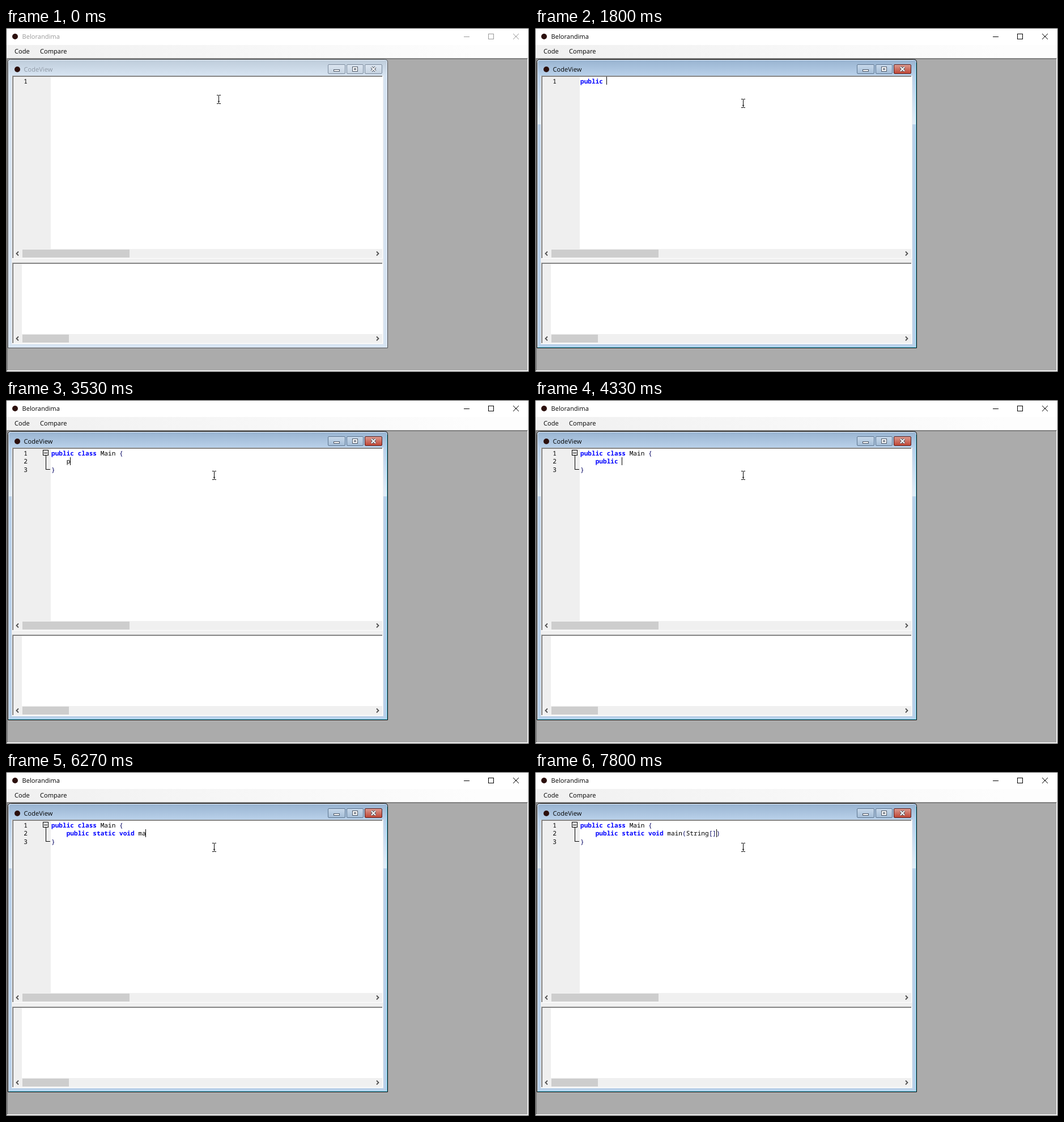
These frames come from a looping animation (923 by 607 pixels, 8000 ms). An HTML page:

```html
<!DOCTYPE html>
<html lang="en">
<head>
<meta charset="utf-8">
<title>Code editor</title>
<style>
  html, body { margin: 0; width: 100%; height: 100%; overflow: hidden; background: #fff; }
  svg { display: block; shape-rendering: crispEdges; }
  text { white-space: pre; text-rendering: geometricPrecision; }
  .ui { font: 11.1px "Open Sans", "Noto Sans", sans-serif; }
  .code { font: 11.11px "Noto Sans Mono", "DejaVu Sans Mono", monospace; }
  .kw { font-weight: bold; fill: #00f; }
  .op { fill: #000060; }
  .smooth { shape-rendering: auto; }
  .line { fill: none; stroke: #000; }

  #stage {
    --title: #999; --control: #999; --childTitle: #8f99a5;
    --bar: #bfcddb; --frame: #d7e4f2; --shine: #d7e4f2;
    --edge: #4b4f54; --glow: #e6eef8;
    --btnTop: #dbe5f0; --btnBottom: #c6d3e1; --btnEdge: #7b8a9c;
    --closeTop: #dbe5f0; --closeBottom: #c6d3e1; --closeEdge: #7b8a9c;
  }
  #stage.active {
    --title: #000; --control: #000; --childTitle: #000;
    --bar: #99b4d1; --frame: #b9d1ea; --shine: #e3eef9;
    --edge: #000; --glow: #5fd3ee;
    --btnTop: #c8d9eb; --btnBottom: #a4bdd7; --btnEdge: #5d7590;
    --closeTop: #dc9c92; --closeBottom: #bf4433; --closeEdge: #571d1d;
  }
  #minus, #square, #cross { fill: none; stroke: var(--control); }
</style>
</head>
<body>
<svg id="stage" width="923" height="607" viewBox="0 0 923 607">
  <defs>
    <linearGradient id="menuFill">
      <stop offset="0" stop-color="#f0f0f0"/><stop offset=".9" stop-color="#fdfdfd"/>
    </linearGradient>
    <linearGradient id="barFill" x2="0" y2="1">
      <stop offset="0" stop-color="var(--bar)"/><stop offset="1" stop-color="var(--frame)"/>
    </linearGradient>
    <linearGradient id="sideFill" x2="0" y2="1">
      <stop offset="0" stop-color="var(--frame)"/><stop offset="1" stop-color="var(--shine)"/>
    </linearGradient>
    <linearGradient id="btnFill" x2="0" y2="1">
      <stop offset="0" stop-color="var(--btnTop)"/><stop offset="1" stop-color="var(--btnBottom)"/>
    </linearGradient>
    <linearGradient id="closeFill" x2="0" y2="1">
      <stop offset="0" stop-color="var(--closeTop)"/><stop offset="1" stop-color="var(--closeBottom)"/>
    </linearGradient>
  </defs>

  <!-- Main window -->
  <rect x=".5" y=".5" width="922" height="606" fill="#fff" stroke="#444"/>
  <circle class="smooth" cx="16" cy="15" r="5" fill="#2b0f0c"/>
  <text class="ui" x="28.5" y="19" fill="var(--title)">Belorandima</text>
  <path id="minus" d="M808 15.5h10"/>
  <rect id="square" x="851.5" y="10.5" width="9" height="9"/>
  <path id="cross" class="smooth" d="M895 10l10 10M905 10l-10 10"/>
  <rect x="1" y="30" width="921" height="23" fill="url(#menuFill)"/>
  <text class="ui" x="15" y="45">Code</text>
  <text class="ui" x="60" y="45">Compare</text>
  <rect x="1" y="53" width="921" height="553" fill="#ababab"/>
  <path d="M1.5 606V53.5H922" fill="none" stroke="#a0a0a0"/>
  <path d="M2.5 605V54.5H921" fill="none" stroke="#696969"/>
  <path d="M2 604.5H920.5V54" fill="none" stroke="#e3e3e3"/>
  <path d="M1 605.5H921.5V53" fill="none" stroke="#fff"/>

  <!-- Child window -->
  <path class="smooth" d="M3.5 564.5V60.5q0-5 5-5H668.500q5 0 5 5V564.500z" fill="var(--frame)" stroke="var(--edge)"/>
  <path class="smooth" d="M5 84V61q0-4 4-4H668q4 0 4 4V84z" fill="url(#barFill)"/>
  <path d="M5 84h6v86h-6zM666 84h6v86h-6z" fill="url(#sideFill)"/>
  <path class="smooth" d="M4.500 563V61q0-4.500 4.500-4.500H668" fill="none" stroke="#eef4fb"/>
  <path d="M5 563.5H672.5V61" fill="none" stroke="var(--glow)"/>
  <circle class="smooth" cx="20" cy="73" r="5" fill="#2b0f0c"/>
  <text class="ui" x="31.500" y="77" fill="var(--childTitle)">CodeView</text>
  <g class="smooth">
    <g fill="url(#btnFill)" stroke="var(--btnEdge)">
      <rect x="568.5" y="64.5" width="30" height="16" rx="1.5"/>
      <rect x="601.5" y="64.5" width="29" height="16" rx="1.5"/>
    </g>
    <rect x="633.5" y="64.5" width="30" height="16" rx="1.5" fill="url(#closeFill)" stroke="var(--closeEdge)"/>
    <g fill="#fff" stroke="#4c5665">
      <rect x="578.5" y="73.5" width="10" height="3"/>
      <rect x="611.5" y="68.5" width="9" height="8"/>
      <rect x="614.5" y="71.5" width="3" height="2"/>
    </g>
    <path d="M645 69l7 7M652 69l-7 7" stroke="#4c5665" stroke-width="4"/>
    <path d="M645 69l7 7M652 69l-7 7" stroke="#fff" stroke-width="2"/>
  </g>
  <rect x="10" y="84" width="656" height="474" fill="#f0f0f0"/>
  <g id="panes"></g>

  <!-- Editor contents -->
  <g class="code">
    <text x="31.3" y="97.5">1</text>
    <g id="block">
      <text x="31.3" y="112">2</text>
      <text x="31.3" y="126.500">3</text>
      <path class="line" d="M65.500 88.500h9v9h-9zM67 93.500h6M70.500 98V122.500H78"/>
      <text class="op" x="80" y="126.500">}</text>
    </g>
    <text id="line1" x="80" y="97.500"></text>
    <text id="line2" x="80" y="112"></text>
  </g>
  <rect id="caret" width="1" height="14"/>
  <path id="pointer" class="line" d="M-3 -7.500h3M1 -7.500h3M.500 -7V7M-3 7.500h3M1 7.500h3M-1 3.500h3"/>
</svg>

<script>
const byId = id => document.getElementById(id);
const stage = byId("stage");
const LOOP = 8000, LEFT = 80, ADVANCE = 6.667;

function pane(top, bottom, gutter, thumbEnd) {
  const barTop = bottom - 16, mid = barTop + 8;
  return `<rect x="11" y="${top}" width="654" height="${bottom - top}" fill="#fff"/>
    <rect x="13" y="${top + 2}" width="${gutter - 13}" height="${barTop - top - 2}" fill="#efefef"/>
    <rect x="13" y="${barTop}" width="651" height="16" fill="#f0f0f0"/>
    <rect x="29" y="${barTop + 1}" width="${thumbEnd - 29}" height="14" fill="#cdcdcd"/>
    <path class="smooth" d="M22 ${mid - 3.5}l-3.500 3.500l3.500 3.500M654 ${mid - 3.5}l3.500 3.500l-3.500 3.500"
      fill="none" stroke="#505050" stroke-width="1.800"/>
    <path d="M11.500 ${bottom}V${top + .5}H665" fill="none" stroke="#a0a0a0"/>
    <path d="M12.500 ${bottom}V${top + 1.5}H664" fill="none" stroke="#696969"/>
    <path d="M11 ${bottom + .5}H664.500V${top}" fill="none" stroke="#fff"/>`;
}
byId("panes").innerHTML = pane(84, 406, 79, 218) + pane(414, 556, 28, 111);

// One key time per character of the script
const script = "public class Main {\npublic static void main(String[]";
const keyTimes = [
  930, 1200, 1270, 1470, 1600, 1670, 1800,
  1930, 2000, 2070, 2130, 2270, 2400,
  2530, 2670, 2730, 2870, 2930, 3130, 3330,
  3530, 3730, 3800, 4000, 4200, 4270, 4330,
  4600, 4800, 4930, 5000, 5130, 5200, 5330,
  5470, 5600, 5800, 5930, 6000,
  6130, 6270, 6400, 6470, 6670,
  6800, 6870, 7070, 7200, 7200, 7330, 7600, 7800
];
const PAIRS = { "{": "}", "(": ")", "[": "]" };

// Brackets the editor closes by itself
function closers(text) {
  let open = "";
  for (const ch of text) {
    if (PAIRS[ch]) open = PAIRS[ch] + open;
    else if (ch === open[0]) open = open.slice(1);
  }
  return open;
}

const highlight = text => text.replace(/\b(public|class|static|void)\b|[{}()[\]]/g,
  (token, keyword) => `<tspan class="${keyword ? "kw" : "op"}">${token}</tspan>`);

let shown;
function draw(t) {
  stage.classList.toggle("active", t >= 70);
  const [x, y] = t < 70 ? [375, 126] : t < 200 ? [371, 129] : [367, 133];
  byId("pointer").setAttribute("transform", `translate(${x - .5 + .5} ${y})`);
  byId("caret").style.display = t < 70 || (t >= 670 && t < 930) ? "none" : "";

  const typed = script.slice(0, keyTimes.filter(time => time <= t).length);
  if (typed === shown) return;
  shown = typed;
  const [first, second] = typed.split("\n");
  const split = second !== undefined;
  const before = split ? "    " + second : first;
  const after = closers(typed);
  byId("line1").innerHTML = highlight(split ? first : first + after);
  byId("line2").innerHTML = split ? highlight(before + after.slice(0, -1)) : "";
  byId("block").style.display = split ? "" : "none";
  byId("caret").setAttribute("x", Math.floor(LEFT + before.length * ADVANCE));
  byId("caret").setAttribute("y", split ? 101 : 86);
}

function tick() {
  draw(performance.now() % LOOP);
  requestAnimationFrame(tick);
}
tick();
</script>
</body>
</html>
```
